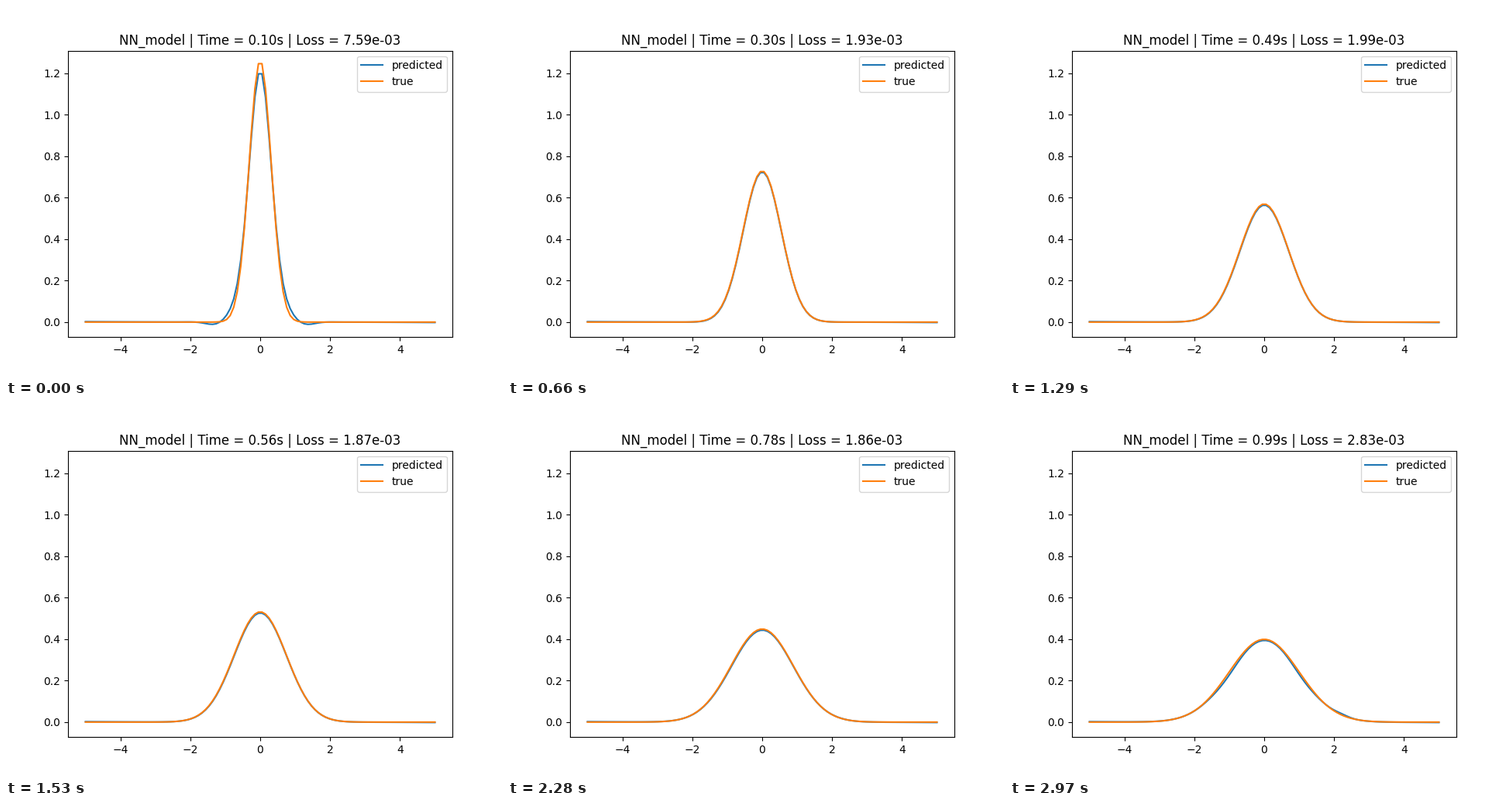
Recreate the animation shown at these times as a matplotlib script. Size 640 px wide and 480 px high, loop 3 s.

```python
import numpy as np
import matplotlib.pyplot as plt
from matplotlib.animation import FuncAnimation

FRAMES, INTERVAL = 100, 30
T0, T1 = 0.1, 1.0

x = np.linspace(-5, 5, 100)

# Loss readings at a few steps, joined on a log scale
LOSS_STEPS = [0, 7, 22, 34, 51, 76, 99]
LOSS = [7.59e-3, 2.53e-3, 1.93e-3, 2.14e-3, 1.87e-3, 1.86e-3, 2.83e-3]


def bell(centre, width, power=2):
    return np.exp(-np.abs((x - centre) / width) ** power)


def exact(t):
    """Heat kernel with variance t."""
    return np.exp(-x**2 / (2 * t)) / np.sqrt(2 * np.pi * t)


def loss(i):
    return np.exp(np.interp(i, LOSS_STEPS, np.log(LOSS)))


def misfit(i):
    """Error of the fit: a damped start, a steady lag and late ripples."""
    start = -0.05 * np.cos(np.pi * x / 0.76) * bell(0, 1.25, 3)
    lag = -0.006 * bell(-0.4, 1.1)
    ripple = (-0.013 * np.sin(np.pi * x / 2.2) ** 4 * bell(0, 1.9, 4)
              + 0.007 * bell(2.2, 0.3))
    tails = -0.002 * (x / 5) ** 3
    ring = np.exp(-i / 5) * np.cos(np.pi * i / 8)
    return (ring * start + (1 - np.exp(-i / 8)) * lag
            + (i / FRAMES) ** 8 * ripple + tails)


fig, ax = plt.subplots(figsize=(6.4, 4.8), dpi=100)
predicted, = ax.plot(x, exact(T0), label="predicted")
true, = ax.plot(x, exact(T0), label="true")
ax.set_ylim(-0.0723, 1.3084)
ax.legend(loc="upper right")
title = ax.set_title("")


def update(i):
    y = exact(T0 + (T1 - T0) * i / (FRAMES - 1))
    predicted.set_ydata(y + misfit(i))
    true.set_ydata(y)
    clock = T0 + (T1 - T0) * i / FRAMES
    title.set_text(f"NN_model | Time = {clock:.2f}s | Loss = {loss(i):.2e}")
    return predicted, true, title


anim = FuncAnimation(fig, update, frames=FRAMES, interval=INTERVAL,
                     repeat=True, repeat_delay=0)
plt.show()
```
